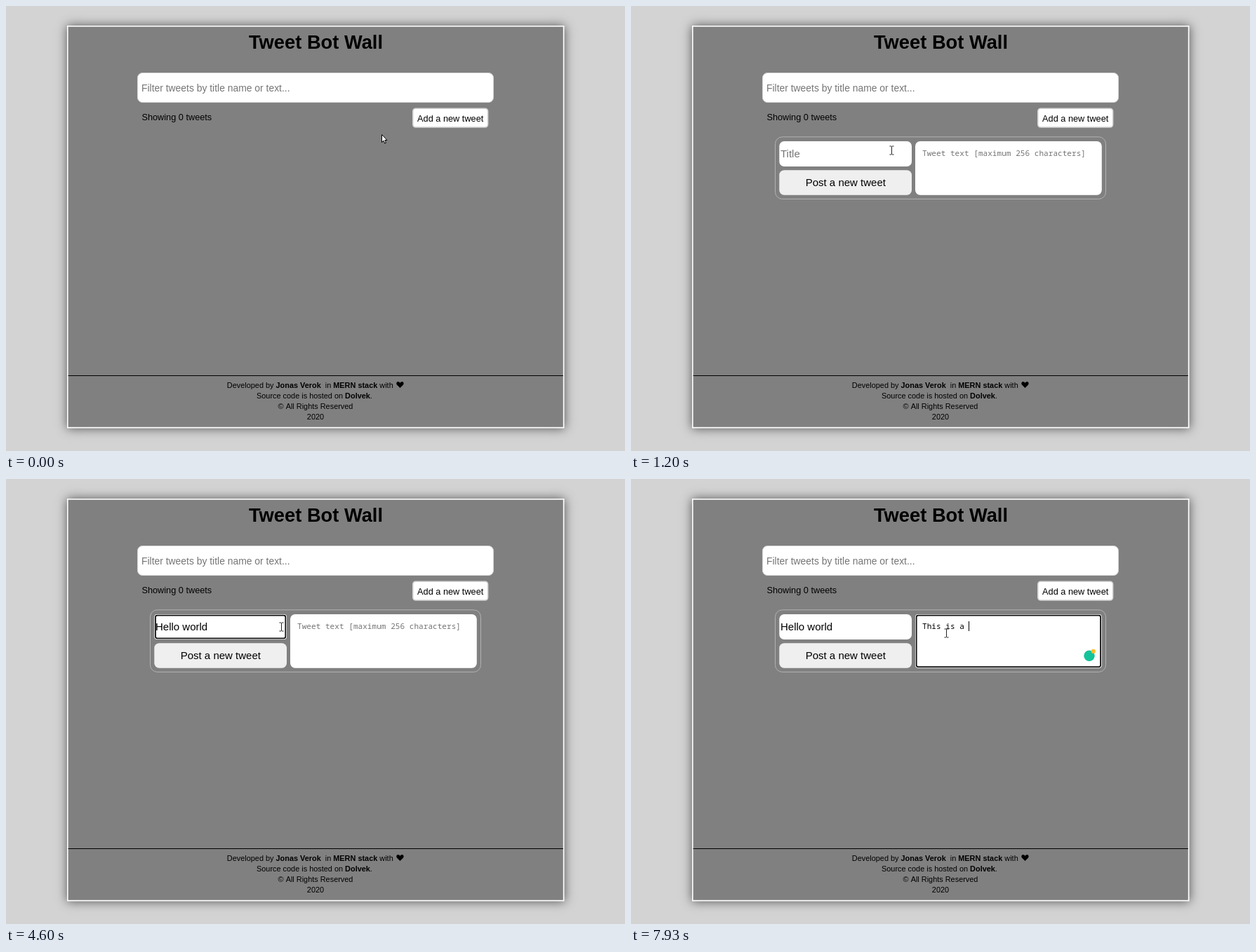
An HTML page with a canvas for the animation above (8000 ms loop, 882x635 px).

```html
<!DOCTYPE html>
<html lang="en">
<head>
<meta charset="utf-8">
<title>Tweet Bot Wall</title>
<style>
  html, body { margin: 0; width: 100%; height: 100%; overflow: hidden; background: #d3d3d3; }
  canvas { display: block; }
</style>
</head>
<body>
<canvas id="stage" width="882" height="635"></canvas>
<script>
const ctx = document.getElementById('stage').getContext('2d');
const LOOP = 8000;
const TICK = 1000 / 15;
const SANS = '"Liberation Sans", Arial, sans-serif';
const MONO = '"Noto Sans Mono", monospace';
const HINT = '#757575';

// Each field: typed text, key press times, caret pauses [from, to].
const titleField = {
  x: 213, y: 216, font: `15px ${SANS}`, hint: 'Title', text: 'Hello world',
  keys: [1930, 2330, 2600, 2800, 3000, 3270, 3470, 3600, 3730, 3870, 4070],
  focus: [1270, 5000], pauses: [[1800, 1930], [4600, 5000]], caret: [202, 17],
};
const bodyField = {
  x: 415, y: 214, font: `11.1px ${MONO}`, hint: 'Tweet text [maximum 256 characters]', text: 'This is a ',
  keys: [5670, 5930, 6270, 6400, 6730, 6930, 7070, 7400, 7670, 7800],
  focus: [5000, LOOP], pauses: [[5530, 5670]], caret: [203, 14],
};

// Pointer moves: [start, end, from x, from y, to x, to y]
const moves = [
  [0, 270, 535, 183, 615, 157],
  [600, 1240, 615, 157, 369, 206],
  [4400, 4600, 369, 206, 392, 211],
  [4600, 4940, 392, 211, 449, 220],
];

const within = (t, [a, b]) => t >= a && t < b;
const ease = p => p * p * (3 - 2 * p);

function box(x, y, w, h, r, fill, stroke, line = 1) {
  ctx.beginPath();
  ctx.roundRect(x, y, w, h, r);
  if (fill) { ctx.fillStyle = fill; ctx.fill(); }
  if (stroke) { ctx.strokeStyle = stroke; ctx.lineWidth = line; ctx.stroke(); }
}

function text(str, x, y, font, color = '#000', align = 'left') {
  ctx.font = font;
  ctx.fillStyle = color;
  ctx.textAlign = align;
  ctx.fillText(str, x, y);
}

function disc(x, y, r, color) {
  ctx.beginPath();
  ctx.arc(x, y, r, 0, Math.PI * 2);
  ctx.fillStyle = color;
  ctx.fill();
}

// Draws alternating regular and bold parts, returns the end of the line.
function richLine(parts, x, y) {
  parts.forEach((part, i) => {
    text(part, x, y, `${i % 2 ? 'bold ' : ''}10.92px ${SANS}`);
    x += ctx.measureText(part).width;
  });
  return x;
}

function heart(x, y) {
  ctx.fillStyle = '#000';
  ctx.fill(new Path2D(`M${x} ${y + 9}l-4.3-4.3c-2.2-2.4 .2-6.3 3-4.2l1.3 1.2l1.3-1.2c2.8-2.1 5.2 1.8 3 4.2z`));
}

function drawPage() {
  ctx.fillStyle = '#d3d3d3';
  ctx.fillRect(0, 0, 882, 635);
  ctx.save();
  ctx.shadowColor = '#555';
  ctx.shadowBlur = 14;
  ctx.fillStyle = '#fff';
  ctx.fillRect(87, 28, 708.5, 574.5);
  ctx.restore();
  ctx.fillStyle = '#808080';
  ctx.fillRect(88.6, 29.6, 705.2, 571.2);

  text('Tweet Bot Wall', 441.5, 61, `bold 27.3px ${SANS}`, '#000', 'center');
  box(187.5, 95.5, 507, 42, 7, '#fff', '#d3d3d3');
  text('Filter tweets by title name or text...', 193, 121.5, `13.9px ${SANS}`, HINT);
  text('Showing 0 tweets', 193.4, 163, `12.74px ${SANS}`);

  ctx.fillStyle = '#000';
  ctx.fillRect(88.6, 527, 705.2, 1);
  richLine(['Developed by ', 'Jonas Verok'], 314.8, 545);
  richLine([' in ', 'MERN stack', ' with'], 451.7, 545);
  heart(561.5, 536);
  richLine(['Source code is hosted on ', 'Dolvek', '.'], 357, 560);
  text('© All Rights Reserved', 441, 575, `10.92px ${SANS}`, '#000', 'center');
  text('2020', 441, 590, `10.92px ${SANS}`, '#000', 'center');
}

function drawAddButton(hover) {
  if (hover) box(579.3, 145.8, 107.8, 27.6, 4, '#a9a9a9', '#fff', 1.6);
  else box(579.8, 146.2, 106.8, 26.8, 4, '#fff', '#d3d3d3', 1.6);
  text('Add a new tweet', 633.2, 164.5, `12.74px ${SANS}`, '#000', 'center');
}

function fieldBox(x, y, w, h, focused) {
  if (!focused) return box(x, y, w, h, 7, '#fff');
  box(x, y, w, h, 4, '#fff');
  box(x + 1.7, y + 1.7, w - 3.4, h - 3.4, 2.5, null, '#101010', 1.8);
}

function drawField(f, t) {
  const typed = f.text.slice(0, f.keys.filter(k => t >= k).length);
  text(typed || f.hint, f.x, f.y, f.font, typed ? '#000' : HINT);
  if (within(t, f.focus) && !f.pauses.some(p => within(t, p))) {
    ctx.fillStyle = '#000';
    ctx.fillRect(Math.floor(f.x + ctx.measureText(typed).width * (typed ? 1 : 0)), f.caret[0], 1, f.caret[1]);
  }
}

function drawHelper(t) {
  disc(653, 252.2, 7.7, '#15c39a');
  if (within(t, [7000, 7860])) {
    const a = (t - 7200) / 800 * Math.PI * 2;
    ctx.beginPath();
    ctx.arc(653, 252.2, 4.3, a - 0.1, a + 2.2);
    ctx.strokeStyle = '#fff';
    ctx.lineWidth = 1.2;
    ctx.stroke();
  }
  if (t >= 7920) disc(658.8, 245.8, 3.1, '#fdbf2d');
}

function drawForm(t) {
  box(205.5, 186.8, 471, 88.6, 10, null, '#b2b2b2');
  fieldBox(211.3, 193, 188.7, 36, within(t, titleField.focus));
  box(211.3, 234.3, 188.7, 35.4, 7, '#efefef');
  text('Post a new tweet', 305.8, 256.5, `15px ${SANS}`, '#000', 'center');
  fieldBox(405, 193, 265.8, 76.8, within(t, bodyField.focus));
  drawField(titleField, t);
  drawField(bodyField, t);
  if (t >= 5200) drawHelper(t);
}

const shapes = {
  arrow: new Path2D('M.5 .5V11.6L3 9.2L4.7 13L6.5 12.2L4.8 8.5H8z'),
  hand: new Path2D('M-1 1C-1-.5 1.2-.5 1.2 1V5.2C2-.0 1.9 4.4 3.4 4.9C4.4 4.6 5 5 5.4 5.7C6.8 5.4 7.6 6 7.6 7.5V10.5L6.3 13.2V15.5H.3V14L-3.6 9.3C-4.4 7.8-2.7 7.2-1.8 8.2L-1 9.2z'),
  beam: new Path2D('M-3-6H-.8L0-5.4L.8-6H3M0-5.4V5.4M-3 6H-.8L0 5.4L.8 6H3'),
};

function pointerAt(t) {
  const [a, b, x0, y0, x1, y1] = moves.filter(m => t >= m[0]).pop();
  const p = ease(Math.min(1, (t - a) / (b - a)));
  return { x: x0 + (x1 - x0) * p, y: y0 + (y1 - y0) * p };
}

function inside({ x, y }, l, top, r, bottom) {
  return x >= l && x <= r && y >= top && y <= bottom;
}

function drawPointer(p, hover, formOpen) {
  const onField = formOpen && (inside(p, 211, 193, 400, 229) || inside(p, 405, 193, 671, 270));
  const kind = hover ? 'hand' : onField ? 'beam' : 'arrow';
  ctx.save();
  ctx.translate(Math.round(p.x), Math.round(p.y));
  ctx.lineWidth = 1;
  ctx.lineJoin = 'round';
  ctx.strokeStyle = kind === 'beam' ? '#222' : '#000';
  if (kind === 'beam') ctx.translate(0.5, 0);
  else {
    ctx.fillStyle = '#fff';
    ctx.fill(shapes[kind]);
  }
  ctx.stroke(shapes[kind]);
  ctx.restore();
}

function draw(now) {
  const step = Math.floor((now % LOOP + 4) / TICK);
  const t = step * TICK % LOOP + 4;
  const p = pointerAt(t);
  const hover = inside(p, 579, 145, 688, 174);
  const formOpen = t >= 600;
  drawPage();
  drawAddButton(hover);
  if (formOpen) drawForm(t);
  drawPointer(p, hover, formOpen);
}

const start = performance.now();
function frame() {
  draw(performance.now() - start);
  requestAnimationFrame(frame);
}
frame();
</script>
</body>
</html>
```
